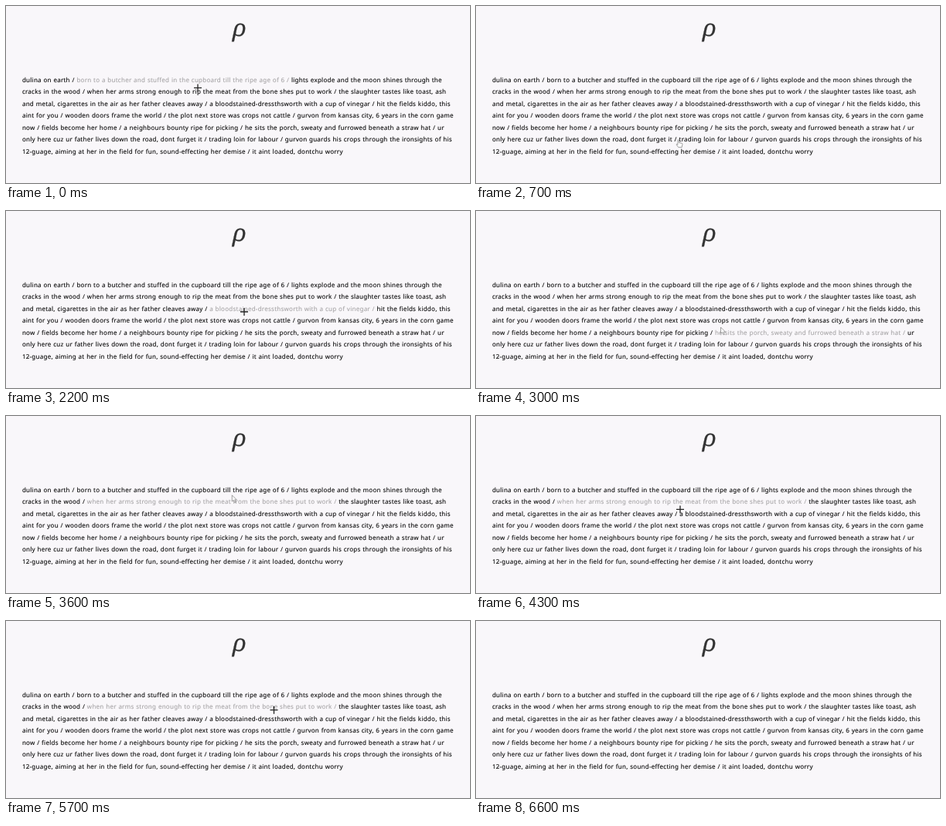
These frames come from a looping animation (600 px wide and 230 px high, 7100 ms). An HTML page:

```html
<!DOCTYPE html>
<html lang="en">
<head>
<meta charset="utf-8">
<style>
  html, body { margin: 0; width: 100%; height: 100%; overflow: hidden; background: #f9f7fa; }
  svg { display: block; }
  text { text-rendering: geometricPrecision; }
  #poem text {
    font: 8px "Noto Sans", "Open Sans", sans-serif;
    letter-spacing: .25px; word-spacing: .335px;
  }
  #poem tspan { fill: #050505; stroke: #050505; stroke-width: .1px; }
  #poem tspan.hover { fill: #a6a4a6; stroke: #a6a4a6; }
  #rho { font: italic 30px "Noto Serif", serif; fill: #333; stroke: #333; stroke-width: .3px; }
</style>
</head>
<body>
<svg width="600" height="230" viewBox="0 0 600 230">
  <text id="rho" x="301.5" y="38.8" text-anchor="middle">ρ</text>
  <g id="poem"></g>
  <g id="pointer">
    <path id="cross" d="M-5 0H5M0-5V5" stroke="#222" stroke-width="1.3"/>
    <path id="arrow" d="M0 0V8.2L2 6.5L3.5 9.8L4.9 9.2L3.5 6H6Z" fill="#fff" stroke="#777" stroke-width=".7"/>
    <path id="hand" d="M-.8 5V.6Q0-.4.8.6V4L4.6 4.8Q5.4 5 5.2 6L4.4 10H0L-2.8 6.4Q-2.6 5-.8 6.6Z" fill="#fff" stroke="#777" stroke-width=".7"/>
  </g>
</svg>
<script>
const LOOP = 7100, STEP = 100, HOVER_LAG = 70;
const LEFT = 20.9, FIRST_ROW = 96, PITCH = 15.5, HALF_ROW = 6.3;

const rows = [
  "dulina on earth / born to a butcher and stuffed in the cupboard till the ripe age of 6 / lights explode and the moon shines through the",
  "cracks in the wood / when her arms strong enough to rip the meat from the bone shes put to work / the slaughter tastes like toast, ash",
  "and metal, cigarettes in the air as her father cleaves away / a bloodstained-dressthsworth with a cup of vinegar / hit the fields kiddo, this",
  "aint for you / wooden doors frame the world / the plot next store was crops not cattle / gurvon from kansas city, 6 years in the corn game",
  "now / fields become her home / a neighbours bounty ripe for picking / he sits the porch, sweaty and furrowed beneath a straw hat / ur",
  "only here cuz ur father lives down the road, dont furget it / trading loin for labour / gurvon guards his crops through the ironsights of his",
  "12-guage, aiming at her in the field for fun, sound-effecting her demise / it aint loaded, dontchu worry"
];
const links = new Set(["born", "when", "the slaughter", "and metal", "a bloodstained", "a neighbours", "he sits"]
  .map(opening => phraseAt(rows.join(" ").indexOf(opening))));

// A phrase ends at its slash and may run on to the next row.
function phraseAt(index) {
  return rows.join(" ").slice(0, index).split("/").length - 1;
}

let phrase = 0;
const poem = document.getElementById("poem");
poem.innerHTML = rows.map((row, i) => {
  const spans = row.split(/(?<=\/ )/).map((part, k) =>
    `<tspan data-row="${i}" data-phrase="${k ? ++phrase : phrase}">${part}</tspan>`);
  return `<text x="${LEFT}" y="${FIRST_ROW + 2.8 + PITCH * i}">${spans.join("")}</text>`;
}).join("");

const spans = [...poem.querySelectorAll("tspan")].map(node => {
  const left = node.getStartPositionOfChar(0).x;
  return { node, left, right: left + node.getComputedTextLength(),
    y: FIRST_ROW + PITCH * node.dataset.row, phrase: +node.dataset.phrase };
});

// The pointer sweeps up and down the poem. Keys: time, sweeps made, x
const keys = [
  [0, -.145, 248], [1400, .495, 275.5], [2200, .972, 308], [3000, 1.447, 316.5],
  [4300, 1.932, 264], [5100, 2.5175, 349.5], [6000, 3.1, 345]
];
const EXIT_START = 6100, EXIT_TIME = 500, EXIT = [615, 8];

const mix = (a, b, u) => a + (b - a) * u;

function pointerAt(t) {
  const clamped = Math.min(t, 5999);
  const next = Math.max(1, keys.findIndex(key => key[0] > clamped));
  const [t0, sweep0, x0] = keys[next - 1], [t1, sweep1, x1] = keys[next];
  const u = (clamped - t0) / (t1 - t0);
  const y = 138 + 40 * Math.sin(2 * Math.PI * mix(sweep0, sweep1, u));
  const out = Math.min(1, Math.max(0, (t - EXIT_START) / EXIT_TIME));
  const ease = out * out * (3 - 2 * out);
  return [mix(mix(x0, x1, u), EXIT[0], ease), mix(y, EXIT[1], ease)];
}

function phraseUnder([x, y]) {
  return spans.find(s => Math.abs(y - s.y) < HALF_ROW && x >= s.left && x < s.right)?.phrase;
}

const pointer = document.getElementById("pointer");

function draw(t) {
  const position = pointerAt(t), under = phraseUnder(position);
  const shape = under === undefined ? "arrow" : links.has(under) ? "cross" : "hand";
  const greyed = phraseUnder(pointerAt(t - HOVER_LAG));
  pointer.setAttribute("transform", `translate(${position})`);
  for (const icon of pointer.children) icon.style.display = icon.id === shape ? "" : "none";
  for (const s of spans) s.node.classList.toggle("hover", s.phrase === greyed && links.has(greyed));
}

const start = performance.now();
function tick() {
  const t = (performance.now() - start) % LOOP;
  draw(Math.floor(t / STEP) * STEP);
  requestAnimationFrame(tick);
}
tick();
</script>
</body>
</html>
```
